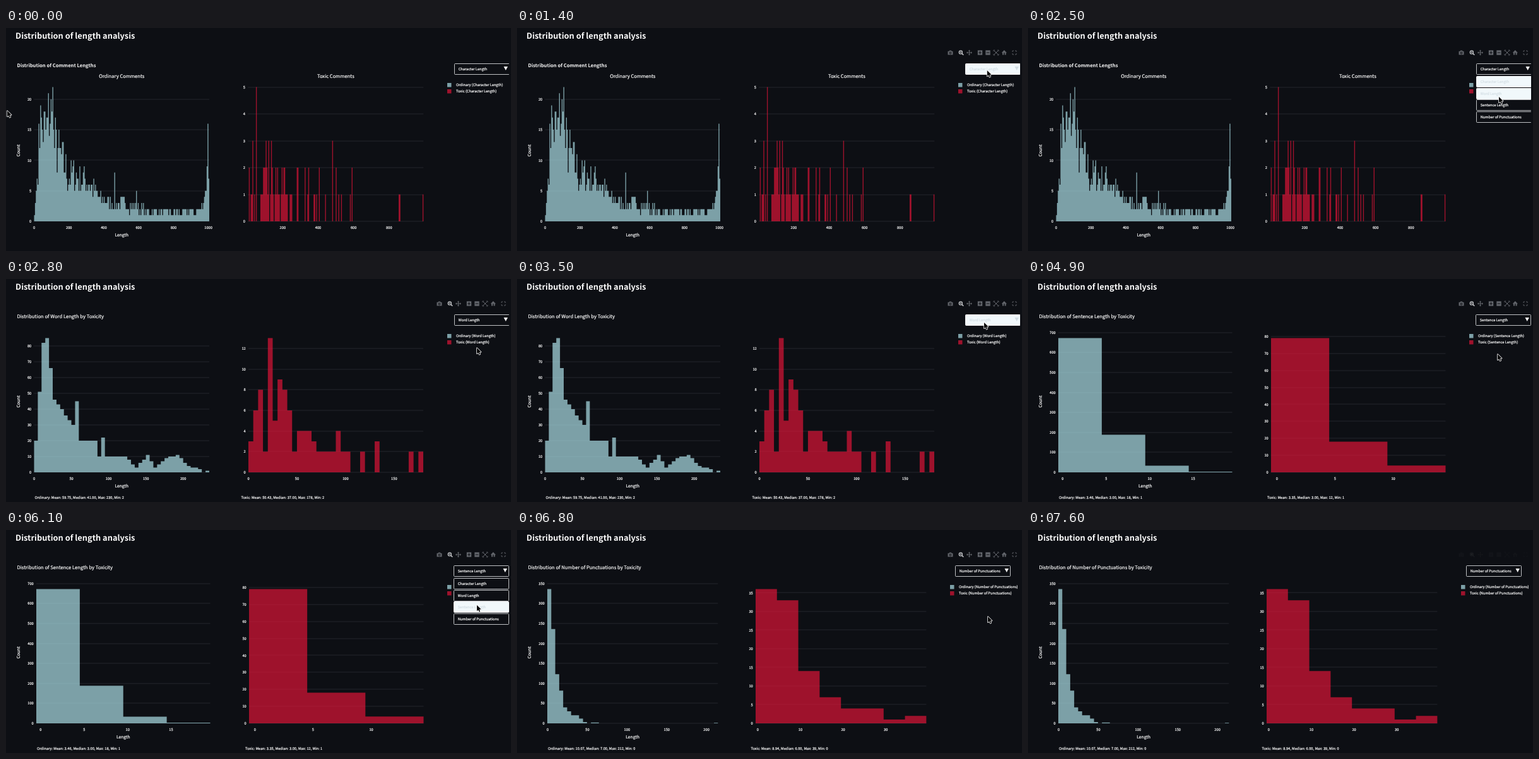
Recreate the animation shown at these times as an HTML page with a canvas. Size 800 px wide and 353 px high, loop 8400 ms.

```html
<!DOCTYPE html>
<html lang="en">
<head>
<meta charset="utf-8">
<title>Length analysis</title>
<style>
  html, body { margin: 0; width: 100%; height: 100%; overflow: hidden; background: #0d0f14; }
  canvas { display: block; width: 800px; height: 353px; }
</style>
</head>
<body>
<canvas id="stage" width="800" height="353"></canvas>
<script>
const ctx = document.getElementById('stage').getContext('2d');
const LOOP = 8400, STEP = 100, BASE = 306, PEAK = 212.5;
const BG = '#0d0f14', INK = '#fafafa', LIT = '#f1f8fb', FAINT = '#d3dee4', GREY = '#62656b';
const TEAL = 'rgba(172,222,229,.7)', RED = 'rgba(220,20,55,.7)';
const FONT = '"Noto Sans CJK JP", "Noto Sans CJK SC", "Open Sans", sans-serif';
const SMALL = 5.7, AXIS = 6.7, TITLE = 7.64;

const clamp = v => Math.max(0, Math.min(1, v));
const ease = u => u * u * (3 - 2 * u);

let seed = 7;
const rand = () => (seed = (seed * 16807) % 2147483647) / 2147483647;

// Bar heights: straight lines between [bin, count] points, optional jitter, then single spikes
function counts(points, spikes = {}, jitter = () => 1) {
  const vals = [];
  for (let k = 1; k < points.length; k++) {
    const [i0, v0] = points[k - 1], [i1, v1] = points[k];
    for (let i = i0; i < i1; i++)
      vals.push(Math.round((v0 + (v1 - v0) * (i - i0) / (i1 - i0)) * jitter(i)));
  }
  vals.push(points[points.length - 1][1]);
  return Object.assign(vals, spikes);
}

const ordinaryChars = () => counts(
  [[0, 1], [3, 7], [6, 14], [14, 15], [18, 18], [22, 13], [33, 9.5], [38, 7.5], [58, 7],
   [76, 3.6], [95, 3], [130, 1.7], [190, 1.5], [197, 5], [198, 9], [199, 16], [200, 7]],
  { 7: 19, 21: 22, 92: 8, 117: 5 },
  i => i < 4 || i > 194 ? 1 : .6 + .8 * rand());

function toxicChars() {
  const spikes = { 1: 2, 5: 3, 9: 5, 20: 3, 23: 3, 26: 3, 40: 2, 41: 2, 55: 2, 56: 2,
    64: 2, 68: 2, 80: 2, 95: 3, 99: 2, 117: 2, 170: 1, 171: 1, 197: 1 };
  const vals = Array.from({ length: 198 }, (_, i) => {
    const dense = i > 14 && i < 50;
    const chance = dense ? .85 : i < 90 ? .3 : .04;
    return rand() > chance ? 0 : dense && i < 42 && rand() < .35 ? 2 : 1;
  });
  return Object.assign(vals, spikes);
}

// Every bar covers five units; first is the value at the left edge
function plot(left, right, xStep, yStep, first, vals) {
  const bin = (right - left) / vals.length, kx = bin / 5;
  return { left, right, xStep, yStep, first, vals, bin, kx,
    zero: left - first * kx, max: Math.max(...vals), mid: (left + right) / 2 };
}

const views = [
  { name: 'Character Length', shift: 1, subs: ['Ordinary Comments', 'Toxic Comments'],
    plots: [plot(44.5, 322, 200, 5, 0, ordinaryChars()),
            plot(383.3, 661.3, 200, 1, 4, toxicChars())] },
  { name: 'Word Length', shift: 1, noteX: [45.5, 372.5],
    notes: ['Mean: 59.75, Median: 41.00, Max: 230, Min: 2', 'Mean: 50.43, Median: 37.00, Max: 178, Min: 2'],
    plots: [plot(44.5, 322, 50, 10, 0, counts(
              [[0, 20], [2, 82], [3, 85], [5, 46], [10, 30], [12, 20], [16, 20], [17, 10], [24, 10],
               [27, 3], [30, 11], [32, 3], [35, 9], [38, 11], [41, 4], [46, 1]], { 11: 45, 18: 22, 45: 0 })),
            plot(384, 661, 50, 2, 0, counts(
              [[0, 3], [2, 8], [6, 9], [8, 6], [10, 4], [12, 4], [14, 2], [20, 2], [21, 0], [35, 2]].map(
                ([i, v]) => [i, v]).slice(0, 9).concat([[35, 0]]),
              { 3: 2, 4: 13, 5: 5, 9: 2, 18: 4, 23: 2, 26: 3, 33: 2, 35: 2 }))] },
  { name: 'Sentence Length', shift: 0, noteX: [49, 379],
    notes: ['Mean: 3.46, Median: 3.00, Max: 18, Min: 1', 'Mean: 3.35, Median: 3.00, Max: 12, Min: 1'],
    plots: [plot(48, 323.5, 5, 100, -.5, [672, 188, 33, 3]),
            plot(385, 661.5, 5, 10, -.5, [79, 18, 4])] },
  { name: 'Number of Punctuations', shift: -15, noteX: [49, 370.5],
    notes: ['Mean: 10.07, Median: 7.00, Max: 212, Min: 0', 'Mean: 8.94, Median: 6.00, Max: 39, Min: 0'],
    plots: [plot(48, 318.3, 50, 50, -.5, counts(
              [[0, 336], [1, 236], [2, 123], [4, 40], [6, 20], [7, 20], [9, 3], [10, 0], [42, 1]].map(
                ([i, v]) => [i, i > 9 ? 0 : v]), { 11: 2, 12: 2, 42: 1 })),
            plot(378, 648.4, 10, 5, -.5, [36, 33, 14, 7, 4, 4, 1, 2])] },
];

// Timeline: view changes, open menus, pointer stops as [ms, x, y]
const viewStarts = [0, 2700, 4600, 6800];
const menuSpans = [[1700, 2700], [3700, 4600], [5700, 6800]];
const path = [
  [0, 2, 131], [900, 733, 88], [1000, 744, 68], [1900, 746, 66], [2500, 746, 109],
  [2800, 746, 109], [3500, 740, 69], [3700, 742, 67], [4300, 744, 119], [4900, 744, 119],
  [5400, 745, 66], [5700, 745, 66], [6100, 746, 119], [6500, 746, 137], [7000, 746, 137],
  [7500, 112, 140], [7600, -20, 134], [LOOP, -20, 134]];

function pointer(t) {
  const i = path.findIndex(p => p[0] > t);
  const [t0, x0, y0] = path[i - 1], [t1, x1, y1] = path[i];
  const u = ease((t - t0) / (t1 - t0));
  return [x0 + (x1 - x0) * u, y0 + (y1 - y0) * u];
}

// Drawing helpers
function text(str, x, y, size = SMALL, align = 'left', color = INK, weight = 400) {
  ctx.font = `${weight} ${size}px ${FONT}`;
  ctx.textAlign = align;
  ctx.fillStyle = ctx.strokeStyle = color;
  ctx.lineWidth = .2;
  ctx.fillText(str, x, y + size * .37);
  if (weight === 400) ctx.strokeText(str, x, y + size * .37);
}

function rect(x, y, w, h, color) {
  ctx.fillStyle = color;
  ctx.fillRect(x, y, w, h);
}

function disc(x, y, r, color) {
  ctx.fillStyle = color;
  ctx.beginPath();
  ctx.arc(x, y, r, 0, 7);
  ctx.fill();
}

function trace(p) {
  ctx.beginPath();
  for (let i = 0; i < p.length; i += 2) ctx.lineTo(p[i], p[i + 1]);
}

function line(color, width, ...p) {
  ctx.strokeStyle = color;
  ctx.lineWidth = width;
  trace(p);
  ctx.stroke();
}

function shape(color, ...p) {
  ctx.fillStyle = color;
  trace(p);
  ctx.fill();
}

function drawPlot(p, color) {
  const ky = PEAK / p.max;
  for (let v = 0; v <= p.max * 1.05; v += p.yStep) {
    const y = BASE - v * ky;
    rect(p.left, Math.round(y) - .5, p.right - p.left, 1, '#25272d');
    text(v, p.left - 4.3, y, SMALL, 'right');
  }
  for (let v = p.first > 0 ? p.xStep : 0; p.zero + v * p.kx <= p.right; v += p.xStep)
    text(v, p.zero + v * p.kx, 315.5, SMALL, 'center');
  const steps = p.vals.flatMap((n, i) => {
    const x = p.left + i * p.bin, y = BASE - n * ky;
    return [x, y, x + p.bin, y];
  });
  shape(color, p.left, BASE, ...steps, p.right, BASE);
}

function drawChart({ name, subs, notes, noteX, plots }) {
  text('Distribution of length analysis', 15, 12, 12.8, 'left', INK, 700);
  if (subs) text('Distribution of Comment Lengths', 17.5, 59, TITLE, 'left', INK, 700);
  else text(`Distribution of ${name} by Toxicity`, 17.5, 59, TITLE);
  plots.forEach((p, i) => {
    drawPlot(p, i ? RED : TEAL);
    if (subs) text(subs[i], p.mid, 76, TITLE, 'center');
    else text(`${i ? 'Toxic' : 'Ordinary'}: ${notes[i]}`, noteX[i], 346);
  });
  text('Length', plots[0].mid, 328, AXIS, 'center');
  ctx.save();
  ctx.translate(20, 194);
  ctx.rotate(-Math.PI / 2);
  text('Count', 0, 0, AXIS, 'center');
  ctx.restore();
}

function drawLegend({ name, shift }) {
  const x = shift < 0 ? 686 : 699;
  ['Ordinary', 'Toxic'].forEach((label, i) => {
    rect(x, 87 + i * 10, 6.5, 6.5, i ? RED : TEAL);
    text(`${label} (${name})`, x + 14, 90.3 + i * 10);
  });
}

function drawButton(x, y, label, lit) {
  ctx.beginPath();
  ctx.roundRect(x, y, 87, 17, 1);
  ctx.fillStyle = lit ? LIT : BG;
  ctx.fill();
  ctx.strokeStyle = lit ? '#fff' : '#d4d6d9';
  ctx.lineWidth = .9;
  ctx.stroke();
  text(label, x + 6.2, y + 8.2, SMALL, 'left', lit ? FAINT : INK);
}

function drawMenu(view, t, px, py) {
  const x = 709.5 + view.shift;
  const over = y => px > x && px < x + 87 && py >= y && py < y + 18;
  const head = over(56);
  ctx.save();
  ctx.beginPath();
  ctx.rect(0, 0, 797, 353);
  ctx.clip();
  drawButton(x, 56.5, view.name, head);
  shape(head ? FAINT : INK, x + 78, 61, x + 84.4, 61, x + 81.2, 67);
  const span = menuSpans.find(([a, b]) => t >= a && t < b);
  if (span) {
    ctx.globalAlpha = clamp((t - span[0] + STEP) / 200);
    views.forEach((v, i) => {
      const y = Math.round(76 + i * 18.6) + .5;
      drawButton(x, y, v.name, v === view || over(y));
    });
  }
  ctx.restore();
}

function drawTools(alpha) {
  const y = 39, c = GREY, hot = '#c9cbce';
  ctx.globalAlpha = alpha;
  // camera
  rect(682.5, 36.8, 8, 5.6, c);
  rect(684.7, 35.6, 3.6, 1.4, c);
  disc(686.5, 39.5, 1.9, BG);
  disc(686.5, 39.5, 1, c);
  // zoom
  disc(702.9, 38.4, 3.2, hot);
  disc(702.9, 38.4, 2, BG);
  line(hot, .8, 701.5, 38.4, 704.3, 38.4);
  line(hot, .8, 702.9, 37, 702.9, 39.8);
  line(hot, 1.6, 705, 40.5, 707.3, 42.8);
  // pan
  line(c, 1, 712.5, y, 720.5, y);
  line(c, 1, 716.5, 35, 716.5, 43);
  for (const s of [-1, 1]) {
    shape(c, 716.5 + s * 4.4, y, 716.5 + s * 2.5, y - 1.7, 716.5 + s * 2.5, y + 1.7);
    shape(c, 716.5, y + s * 4.4, 714.8, y + s * 2.5, 718.2, y + s * 2.5);
  }
  // zoom in and out
  for (const x of [733.5, 746]) {
    rect(x - 3.7, y - 3.7, 7.4, 7.4, c);
    rect(x - 2.3, y - .5, 4.6, 1, BG);
  }
  rect(733, y - 2.3, 1, 4.6, BG);
  // autoscale and fullscreen
  line(c, 1, 756, 36, 762, 42);
  line(c, 1, 762, 36, 756, 42);
  for (const [cx, r] of [[759, 4], [788, 3]])
    for (const sx of [-1, 1]) for (const sy of [-1, 1]) {
      const x = cx + sx * r, cy = y + sy * r;
      line(c, .9, x - sx * 1.9, cy, x, cy, x, cy - sy * 1.9);
    }
  // home
  shape(c, 771.8, 35, 776, 39.2, 767.6, 39.2);
  rect(769, 39, 2.1, 3.5, c);
  rect(772.5, 39, 2.1, 3.5, c);
  ctx.globalAlpha = 1;
}

function drawPointer(x, y) {
  ctx.save();
  ctx.translate(x, y);
  trace([0, 0, 0, 9.3, 2.2, 7.4, 3.7, 10.7, 5.2, 10, 3.8, 6.8, 6.6, 6.6]);
  ctx.closePath();
  ctx.lineJoin = 'round';
  ctx.strokeStyle = '#f2f2f2';
  ctx.lineWidth = 1.6;
  ctx.stroke();
  ctx.fillStyle = '#050506';
  ctx.fill();
  ctx.restore();
}

function render(t) {
  const view = views[viewStarts.filter(s => s <= t).length - 1];
  const [px, py] = pointer(t);
  rect(0, 0, 800, 353, BG);
  ctx.textRendering = 'geometricPrecision';
  drawChart(view);
  drawLegend(view);
  drawTools(t < 7100 ? clamp(t / 300) : Math.max(.06, 1 - (t - 7000) / 600));
  drawMenu(view, t, px, py);
  drawPointer(px, py);
}

const start = performance.now();
function tick() {
  const t = (performance.now() - start) % LOOP;
  render(Math.floor(t / STEP) * STEP);
  requestAnimationFrame(tick);
}
tick();
</script>
</body>
</html>
```
